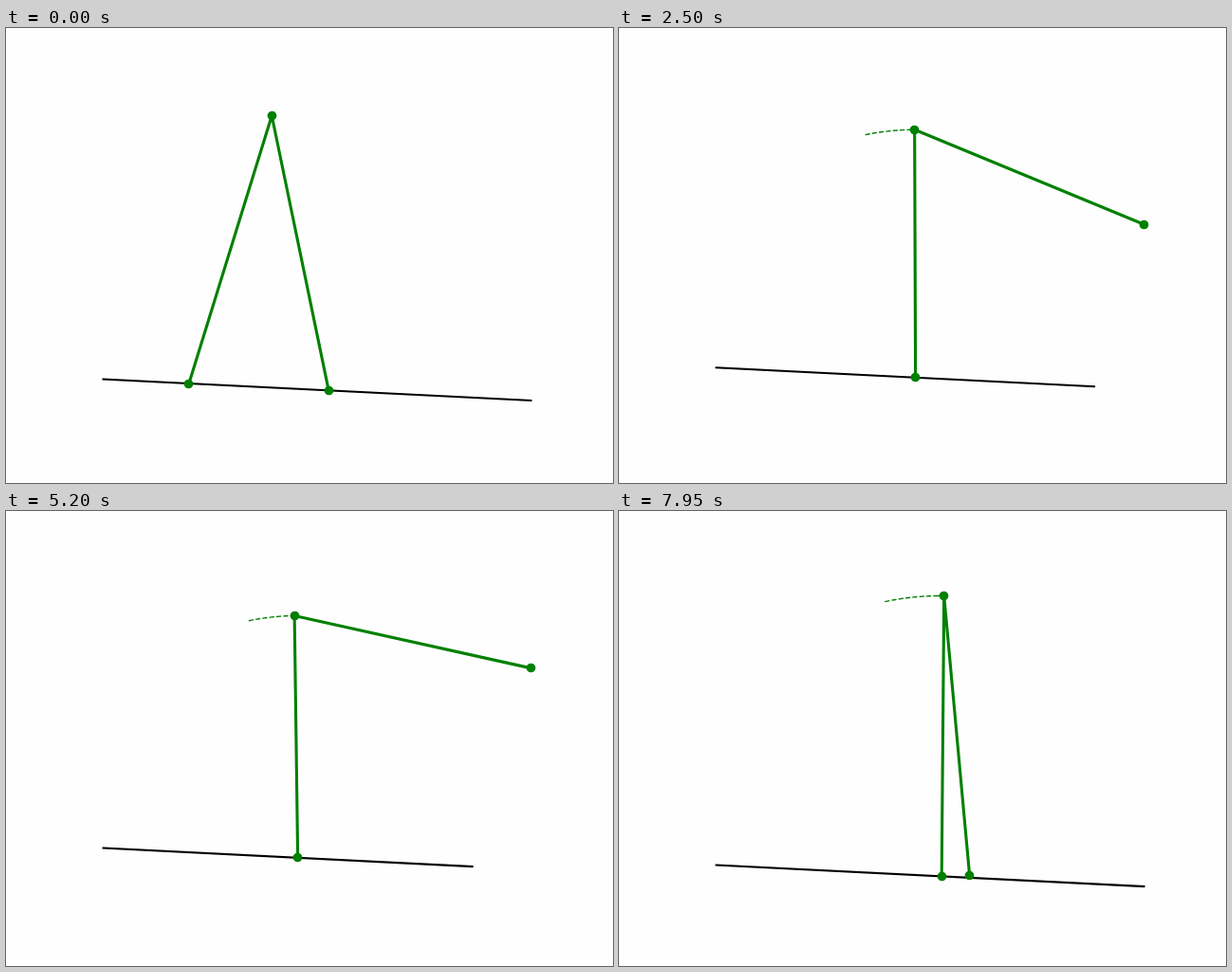
An HTML page with a canvas that plays this animation: 640 by 480 pixels, repeating every 8000 ms.

```html
<!DOCTYPE html>
<html lang="en">
<head>
<meta charset="utf-8">
<title>Two-legged walker</title>
<style>
html, body { margin: 0; width: 100%; height: 100%; overflow: hidden; background: #fefefe; }
canvas { display: block; }
</style>
</head>
<body>
<canvas id="stage" width="640" height="480"></canvas>
<script>
const ctx = document.getElementById('stage').getContext('2d');
const LOOP = 8000, STEP = 50;
const GREEN = '#008000', PAPER = '#fefefe';

// Plot area after its margins, in pixels.
const VIEW = { left: 102.55, width: 450.9, midY: 242.75 };
// Ground around the planted foot, in leg lengths.
const GROUND = { left: -0.803, right: 0.7205, slope: 0.05 };

// Leg angles from the vertical, in radians, at t seconds.
// The planted leg rises to upright, then sways slowly around it.
function stanceAngle(t) {
  const rise = -0.196 * Math.exp(-0.85 * t - 0.14 * t * t);
  const sway = -0.003 - 0.012 * Math.cos(1.083 * (t - 4.75));
  return rise + sway;
}

// The free leg swings out past horizontal and settles back down.
function swingAngle(t) {
  const d = t - 3.9;
  const lift = 1.69 * Math.exp(-0.11 * d ** 2 - 0.0168 * d ** 3);
  const windUp = 1.159 * Math.exp(-((t / 2.163) ** 3));
  return lift - windUp;
}

function hipAt(t) {
  const angle = stanceAngle(t);
  return [Math.sin(angle), Math.cos(angle)];
}

function line(points, color, width, cap = 'square', dash = []) {
  ctx.strokeStyle = color;
  ctx.lineWidth = width;
  ctx.lineCap = cap;
  ctx.lineJoin = 'round';
  ctx.setLineDash(dash);
  ctx.beginPath();
  points.forEach(([x, y]) => ctx.lineTo(x, y));
  ctx.stroke();
}

// Dots sit on whole pixels.
function dot([x, y]) {
  ctx.fillStyle = GREEN;
  ctx.beginPath();
  ctx.arc(Math.floor(x) + 0.5, Math.floor(y) + 0.5, 4.86, 0, 2 * Math.PI);
  ctx.fill();
}

function draw(ms) {
  const t = ms / 1000;
  const trail = [];
  for (let s = 0; s <= ms; s += STEP) trail.push(hipAt(s / 1000));

  const hip = hipAt(t), swing = swingAngle(t);
  const foot = [0, 0];
  const free = [hip[0] + Math.sin(swing), hip[1] - Math.cos(swing)];
  const ground = [GROUND.left, GROUND.right].map(x => [x, -x * GROUND.slope]);

  // Fit the width to the content and centre its height.
  const scale = VIEW.width / (Math.max(GROUND.right, free[0]) - GROUND.left);
  const top = Math.max(free[1], ...trail.map(p => p[1]));
  const middle = (top + ground[1][1]) / 2;
  const place = ([x, y]) => [
    VIEW.left + (x - GROUND.left) * scale,
    VIEW.midY - (y - middle) * scale
  ];

  ctx.fillStyle = PAPER;
  ctx.fillRect(0, 0, 640, 480);
  line(ground.map(place), '#000', 2.08);
  line([foot, hip, free].map(place), GREEN, 3.1);
  line(trail.map(place), GREEN, 1.39, 'butt', [5.14, 2.22]);
  [foot, hip, free].map(place).forEach(dot);
}

const start = performance.now();
function tick() {
  const ms = (performance.now() - start) % LOOP;
  draw(Math.floor(ms / STEP) * STEP);
  requestAnimationFrame(tick);
}
tick();
</script>
</body>
</html>
```
